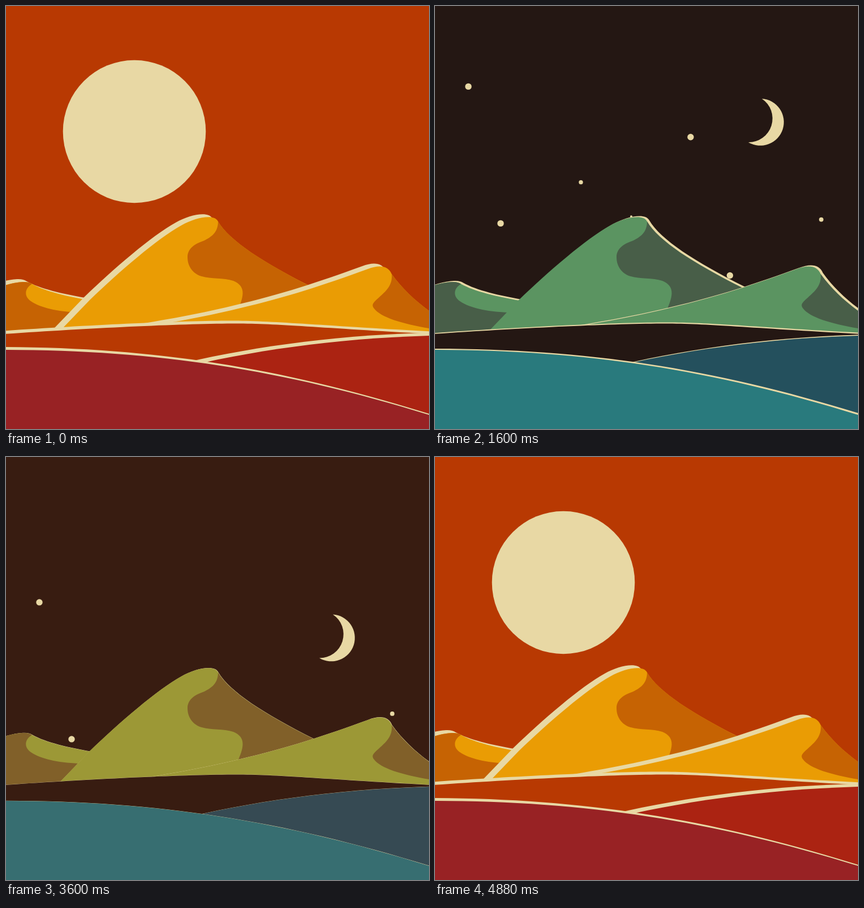
An HTML page with a canvas that plays this animation: 748x748 px, repeating every 5040 ms.

```html
<!DOCTYPE html>
<html lang="en">
<head>
<meta charset="utf-8">
<title>Desert day and night</title>
<style>
html, body { margin: 0; width: 100%; height: 100%; overflow: hidden; }
canvas { display: block; width: 100vw; height: 100vh; }
</style>
</head>
<body>
<canvas width="748" height="748"></canvas>
<script>
const ctx = document.querySelector('canvas').getContext('2d');
const STEP = 80, LOOP = 63, STEPS = 28;
const CREAM = '#e8d8a4';

// Day and night colours
const SKY = [[184, 57, 2], [0, 15, 23]];
const LIGHT = [[234, 156, 4], [13, 144, 147]];
const SHADE = [[198, 99, 3], [3, 91, 110]];
const RIDGE = [[171, 35, 18], [3, 91, 111]];
const FRONT = [[152, 34, 36], [13, 144, 147]];

const clamp = (v, lo, hi) => Math.min(hi, Math.max(lo, v));
const smooth = (v, from, to) => {
  const u = clamp((v - from) / (to - from), 0, 1);
  return u * u * (3 - 2 * u);
};
const mix = ([a, b], k) => `rgb(${a.map((v, i) => Math.round(v + (b[i] - v) * k))})`;

const leftCrest = 'M-30 502C-10 497 5 491 20 489C34 487 41 488 46 491.5';
const mainFall = 'C395 415 455 454 545 499L640 545V600';
const rightFall = 'C700 499 722 520 748 539L790 568V600';

// Back to front; dunes have a shaded part on top of the lit body
const hills = [
  {
    body: leftCrest + 'C70 505 110 514 150 521L200 530V600H-30Z',
    shade: leftCrest + 'C32 500 32 514 44 522C62 534 90 540 128 542L200 545V600H-30Z'
  },
  {
    body: 'M71 600L148 520C200 470 268 411 310 388C335 374 368 367 375 381' + mainFall + 'Z',
    shade: 'M375 381' + mainFall + 'H411V535C421 512 424 495 402 486C385 480 362 483 346 478' +
      'C332 474 321 462 321 444C321 430 332 421 350 415C364 408 375 400 375 381Z'
  },
  {
    body: 'M200 575C280 562 345 551 411 535C500 514 560 494 640 465C660 457 676 459 682 474' +
      rightFall + 'H200Z',
    shade: 'M682 474' + rightFall + 'V577L748 570C700 562 662 550 651 535' +
      'C645 528 650 524 660 515C672 504 684 494 682 474Z'
  },
  { body: 'M-30 582C120 571 300 562 400 561.5C480 561 560 570 790 582V760H-30Z', color: SKY },
  { body: 'M300 642C430 610 580 588 748 583L790 582V760H300Z', color: RIDGE },
  { body: 'M-30 608C250 606 480 640 748 723L790 736V760H-30Z', color: FRONT }
];
for (const hill of hills) {
  hill.body = new Path2D(hill.body);
  if (hill.shade) hill.shade = new Path2D(hill.shade);
}

const moon = new Path2D('M2.5-41.5A41.5 41.5 0 1 1-21.5 35.5A42 42 0 0 0 2.5-41.5Z');

// x, y at rest, radius, falling speed
const stars = [
  [59, 82, 5.7, 3], [452, 111, 5.7, 6], [258, 170.7, 3.7, 7], [347, 291.7, 2, 4],
  [116, 324, 5.7, 3], [683, 337.3, 3.9, 2], [521.5, 436.3, 5.7, 2]
];

function disc(x, y, r) {
  ctx.beginPath();
  ctx.arc(x, y, r, 0, 7);
  ctx.fill();
}

function fillAt(path, x, y, color) {
  ctx.save();
  ctx.translate(x, y);
  ctx.fillStyle = color;
  ctx.fill(path);
  ctx.restore();
}

function draw(now) {
  const tick = Math.floor(now / STEP) % LOOP;
  const day = clamp(Math.min(tick - 2, 61 - tick), 0, STEPS); // steps away from full day
  const night = STEPS - day;
  const ground = smooth(day, 0.5, 25);
  const dunes = smooth(day, 12, 22);

  ctx.fillStyle = mix(SKY, ground);
  ctx.fillRect(0, 0, 748, 748);

  ctx.fillStyle = CREAM;
  disc(227, 222 + 26 * (day / 5) ** 3.21, 126.3);
  const fall = (Math.exp(0.53 * night) - 1) / 9.9;
  for (const [x, y, r, speed] of stars) disc(x, y + speed * fall, r);
  fillAt(moon, 575.5, 145 + 3 * fall, CREAM);

  // The rim of light points left by day and right by night
  const dayRim = Math.max(0, 1 - (day / 11) ** 2);
  const nightRim = 1 - smooth(night, 6, 13);
  const rim = dayRim + nightRim;
  for (const { body, shade, color } of hills) {
    if (rim > 0) fillAt(body, 10 * (nightRim - dayRim), -5 * rim, CREAM);
    fillAt(body, 0, 0, color ? mix(color, ground) : mix(LIGHT, dunes));
    if (shade) fillAt(shade, 0, 0, mix(SHADE, dunes));
  }
}

const start = performance.now();
function frame() {
  draw(performance.now() - start);
  requestAnimationFrame(frame);
}
frame();
</script>
</body>
</html>
```
